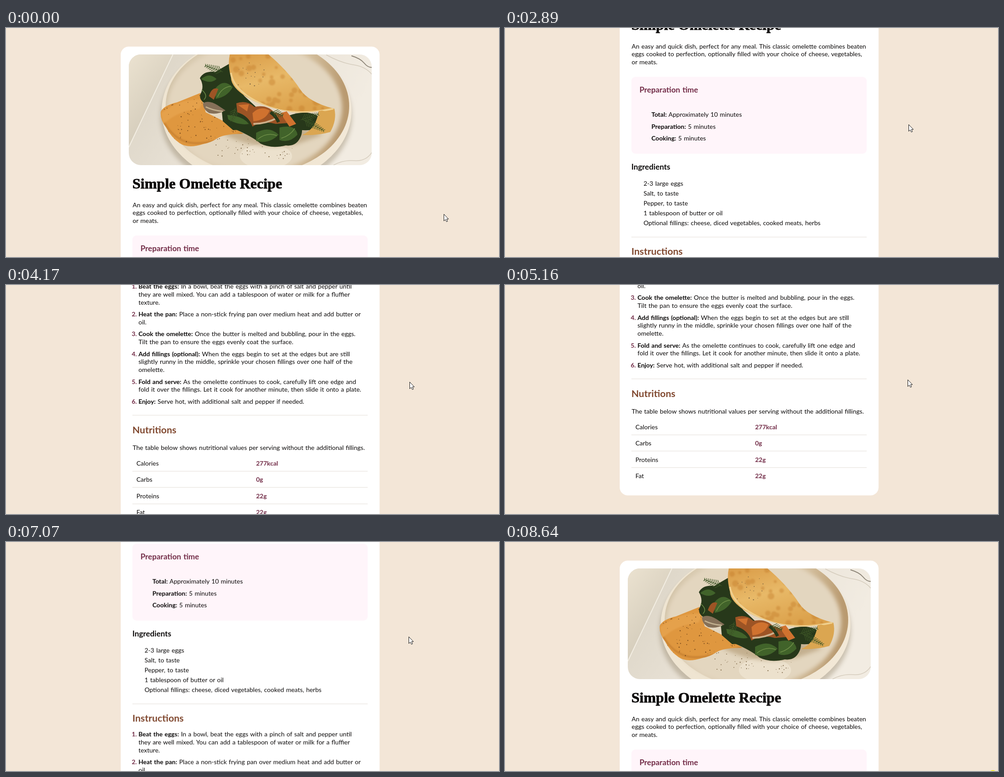
Animation of 1096x511 px, one loop 8.77 s. Source, as an HTML page:

```html
<!DOCTYPE html>
<html lang="en">
<head>
<meta charset="utf-8">
<title>Omelette recipe</title>
<style>
  html, body { margin: 0; width: 100%; height: 100%; overflow: hidden; background: #f3e6d7; }
  svg { display: block; width: 1096px; height: 511px; }
  text { font: 14px Lato, "Open Sans", sans-serif; word-spacing: .9px; fill: #0b0909; }
  .b { font-weight: 700; }
  .rose { font-weight: 700; fill: #722c47; }
  .h2 { font-size: 21.5px; font-weight: 700; fill: #80482f; }
  .h3 { font-size: 17.3px; font-weight: 700; }
  .title { font: 700 32.6px "Liberation Serif", "Noto Serif", serif; word-spacing: 0; stroke: #0b0909; stroke-width: .8px; }
  .rule { stroke: #e4ded8; }

  #page, #cursor, #spot { animation: 8770ms steps(1) infinite; }
  #page { animation-name: scroll; }
  #cursor { animation-name: point; }
  #spot { animation-name: spot; }

  @keyframes scroll {
    0% { transform: translateY(0); }
    22.83% { transform: translateY(0); animation-timing-function: steps(3); }
    25.177% { transform: translateY(-87.5px); animation-timing-function: steps(10); }
    32.93% { transform: translateY(-354px); }
    35.26% { transform: translateY(-354px); animation-timing-function: steps(16); }
    47.526% { transform: translateY(-885px); }
    53.61% { transform: translateY(-885px); animation-timing-function: steps(3); }
    55.85% { transform: translateY(-966px); }
    69.01% { transform: translateY(-966px); animation-timing-function: steps(5); }
    72.84% { transform: translateY(-768px); animation-timing-function: steps(3); }
    75.23% { transform: translateY(-612px); }
    77.56% { transform: translateY(-612px); animation-timing-function: steps(11); }
    86.07% { transform: translateY(-52px); animation-timing-function: steps(2); }
    87.66%, 100% { transform: translateY(0); }
  }
  @keyframes point {
    0% { transform: translate(973px, 415px); animation-timing-function: steps(3); }
    2.37% { transform: translate(880px, 350px); animation-timing-function: steps(5); }
    6.25% { transform: translate(660px, 175px); animation-timing-function: steps(3); }
    8.643% { transform: translate(590px, 143px); animation-timing-function: steps(2); }
    10.467% { transform: translate(559px, 150px); animation-timing-function: steps(3); }
    12.748% { transform: translate(544px, 170px); animation-timing-function: steps(6); }
    17.1% { transform: translate(640px, 232px); animation-timing-function: steps(4); }
    20.616% { transform: translate(883px, 217px); }
    21.3% { transform: translate(897px, 215px); }
    34.41% { transform: translate(897px, 210px); }
    36% { transform: translate(897px, 216px); }
    49% { transform: translate(896px, 211px); }
    50.6% { transform: translate(895px, 211px); }
    82.1% { transform: translate(899px, 211px); }
    88.46% { transform: translate(925px, 235px); }
    89.26% { transform: translate(974px, 273px); opacity: 1; }
    90.05%, 100% { transform: translate(974px, 273px); opacity: 0; }
  }
  @keyframes spot {
    0% { opacity: 0; }
    98.5%, 100% { opacity: 1; }
  }
</style>
</head>
<body>
<svg viewBox="0 0 1096 511">
  <defs>
    <clipPath id="frame"><rect x="273" y="59" width="540" height="247" rx="27"/></clipPath>
    <clipPath id="paste-clip"><path d="M344 187Q350 173 380 166L432 145 444 188 482 207 528 236Q485 236 470 246T438 259Q405 270 386 257T356 222Q342 204 344 187Z"/></clipPath>
    <clipPath id="egg-clip"><path id="fold" d="M498 57H581Q602 74 622 96T654 137Q672 165 729 180 726 190 702 184 666 192 632 187 570 176 535 154 500 132 500 110 492 80 498 57Z"/></clipPath>
    <linearGradient id="stone" x2="1" y2=".3">
      <stop stop-color="#d9d2c3"/><stop offset=".5" stop-color="#e9e2d6"/><stop offset="1" stop-color="#f2ece2"/>
    </linearGradient>
    <linearGradient id="wall" x2=".6" y2="1">
      <stop stop-color="#ebe2d0"/><stop offset="1" stop-color="#cfc7b6"/>
    </linearGradient>
    <linearGradient id="rim" x2="1">
      <stop stop-color="#efe5d2"/><stop offset=".6" stop-color="#eee3cf"/><stop offset="1" stop-color="#f3e9d8"/>
    </linearGradient>
    <linearGradient id="dish" x2="1" y2=".1">
      <stop stop-color="#cfc0a4"/><stop offset=".3" stop-color="#dfd1b9"/><stop offset=".75" stop-color="#d8c5a5"/><stop offset="1" stop-color="#b99a70"/>
    </linearGradient>
    <linearGradient id="egg" x2=".5" y2="1">
      <stop stop-color="#d99a45"/><stop offset=".5" stop-color="#e8b968"/><stop offset="1" stop-color="#dca24c"/>
    </linearGradient>
    <filter id="soft" x="-.5" y="-.5" width="2" height="2"><feGaussianBlur stdDeviation="5"/></filter>
    <filter id="smooth"><feGaussianBlur stdDeviation="1.5"/></filter>
  </defs>

  <g id="page">
    <rect x="255" y="41.5" width="575.5" height="1394" rx="18" fill="#fff"/>

    <g clip-path="url(#frame)">
      <rect x="273" y="59" width="540" height="247" fill="url(#stone)"/>
      <path d="M273 59H370L273 263Z" fill="url(#wall)"/>
      <path d="M371 59 273 266" stroke="#f3eee3" stroke-width="2"/>
      <g fill="none" stroke="#d5ccbd" stroke-width="1.5">
        <path d="M768 62Q788 68 796 78T813 88" stroke="#8d8577" stroke-width="2"/>
        <path d="M712 60Q745 78 772 82T813 103M728 306Q750 294 775 296T813 278"/>
      </g>
      <ellipse cx="556" cy="198" rx="213" ry="164" fill="#8f8065" opacity=".4" filter="url(#soft)"/>
      <ellipse cx="557" cy="185" rx="211" ry="164" fill="url(#rim)"/>
      <ellipse cx="559" cy="174" rx="204" ry="151" fill="url(#dish)"/>
      <ellipse cx="553" cy="178" rx="194" ry="142" fill="#e3d6bf" filter="url(#soft)"/>
      <ellipse cx="578" cy="286" rx="58" ry="28" fill="#ece1cd"/>
      <path d="M523 296Q545 316 590 312T634 278" fill="none" stroke="#cfbf a0" stroke-width="2"/>
      <path d="M480 235Q560 278 650 258L705 238 600 200Z" fill="#a58a60" opacity=".5" filter="url(#soft)"/>

      <g clip-path="url(#paste-clip)">
        <rect x="340" y="140" width="195" height="130" fill="#df973f"/>
        <path d="M345 190Q390 155 440 160L430 180Q380 185 350 215Z" fill="#e5a14c" filter="url(#smooth)"/>
        <path d="M352 212Q375 250 410 256T528 234" fill="none" stroke="#c98231" stroke-width="4" filter="url(#smooth)"/>
        <g id="pepper" fill="#7c4d1d"></g>
      </g>

      <g fill="#27381a">
        <path d="M431 112Q440 95 465 98L496 80 505 120 530 152 560 180 550 225 505 228 482 208 480 188 448 172Q428 162 432 148 442 130 431 112Z"/>
        <path d="M500 205 570 205 650 205Q664 225 654 245T622 262Q590 270 566 258 545 240 500 222Z"/>
        <path d="M630 195Q680 178 708 208L690 226Q655 232 632 222Z"/>
      </g>
      <path d="M438 168Q450 160 470 172L488 184Q470 194 452 190 438 182 438 168Z" fill="#857058"/>
      <path d="M444 176Q460 184 482 186" fill="none" stroke="#c2b08f" stroke-width="3"/>
      <g fill="#41632a">
        <path d="M434 114Q452 98 468 114 454 126 434 114ZM466 134Q484 112 504 132 492 154 466 158ZM556 234Q585 217 606 238 585 260 556 252ZM608 222Q644 214 648 238 630 258 608 250ZM492 194Q526 196 540 214 518 218 494 204Z"/>
      </g>
      <path d="M435 138Q450 150 440 160M470 154Q480 132 500 130M560 248Q580 232 602 240M612 246Q632 240 642 224" fill="none" stroke="#6f8f48" stroke-width="1.5"/>
      <path d="M451 152Q458 130 472 136L462 160ZM512 168Q535 160 552 176 580 170 596 188 616 190 628 212L600 214Q570 206 548 220 540 196 514 188Z" fill="#9d5425"/>
      <path d="M548 190Q565 172 586 184 578 206 550 208ZM516 172 540 170 536 186ZM610 190 624 186 645 214 630 220Z" fill="#d0722f"/>
      <path d="M550 214Q578 214 604 200" fill="none" stroke="#cdb08b" stroke-width="4"/>
      <path d="M588 188Q600 196 606 210" fill="none" stroke="#27381a" stroke-width="7"/>

      <path d="M695 185 730 180Q736 205 721 232 695 240 658 239 690 225 695 185Z" fill="#dba651"/>
      <use href="#fold" fill="url(#egg)"/>
      <g clip-path="url(#egg-clip)">
        <g id="browned" fill="#c27a2c" opacity=".4" filter="url(#smooth)"></g>
        <path d="M500 100Q505 134 550 160T640 187Q676 191 728 180" fill="none" stroke="#efcf8d" stroke-width="4"/>
      </g>
      <g id="specks" fill="#77603f"></g>
      <g id="dill" fill="none" stroke="#3d5526" stroke-width="1.2"></g>
    </g>

    <rect x="281" y="463" width="523" height="171.5" rx="9" fill="#fff5fa"/>
    <g id="copy"></g>
  </g>

  <ellipse id="spot" cx="1084.5" cy="513" rx="6" ry="4" fill="#f4ee2a"/>
  <path id="cursor" d="M.5.5V15.5L3.9 12.4 6.3 17.3 8.8 16.2 6.5 11.3H10.8Z" fill="#fff" stroke="#111" stroke-width="1"/>
</svg>
<script>
  const LINE = 17.7;
  const el = id => document.getElementById(id);
  let out = "";
  const text = (x, y, s, cls = "") => out += `<text x="${x}" y="${y}" class="${cls}">${s}</text>`;
  const rule = y => out += `<path class="rule" d="M281 ${y}H804"/>`;
  const lines = (x, y, step, list) => list.forEach((s, i) => text(x, y + i * step, s));
  const bold = s => `<tspan class="b">${s}</tspan>`;

  text(281, 358, "Simple Omelette Recipe", "title");
  lines(281.5, 399.5, LINE, [
    "An easy and quick dish, perfect for any meal. This classic omelette combines beaten",
    "eggs cooked to perfection, optionally filled with your choice of cheese, vegetables,",
    "or meats."
  ]);

  text(299, 498, "Preparation time", "h3 rose");
  lines(325.5, 552, 26.5, [
    bold("Total:") + " Approximately 10 minutes",
    bold("Preparation:") + " 5 minutes",
    bold("Cooking:") + " 5 minutes"
  ]);

  text(281, 669.5, "Ingredients", "h3");
  lines(308, 705.8, 22.1, [
    "2-3 large eggs",
    "Salt, to taste",
    "Pepper, to taste",
    "1 tablespoon of butter or oil",
    "Optional fillings: cheese, diced vegetables, cooked meats, herbs"
  ]);
  rule(820.5);

  text(281, 860, "Instructions", "h2");
  const steps = [
    ["Beat the eggs:", "In a bowl, beat the eggs with a pinch of salt and pepper until",
      "they are well mixed. You can add a tablespoon of water or milk for a fluffier", "texture."],
    ["Heat the pan:", "Place a non-stick frying pan over medium heat and add butter or", "oil."],
    ["Cook the omelette:", "Once the butter is melted and bubbling, pour in the eggs.",
      "Tilt the pan to ensure the eggs evenly coat the surface."],
    ["Add fillings (optional):", "When the eggs begin to set at the edges but are still",
      "slightly runny in the middle, sprinkle your chosen fillings over one half of the", "omelette."],
    ["Fold and serve:", "As the omelette continues to cook, carefully lift one edge and",
      "fold it over the fillings. Let it cook for another minute, then slide it onto a plate."],
    ["Enjoy:", "Serve hot, with additional salt and pepper if needed."]
  ];
  let y = 893.2;
  steps.forEach(([name, first, ...rest], i) => {
    text(279.5, y, i + 1 + ".", "rose");
    lines(294.5, y, LINE, [bold(name) + " " + first, ...rest]);
    y += LINE * (rest.length + 1) + LINE / 2;
  });
  rule(1175.5);

  text(281, 1215.5, "Nutritions", "h2");
  text(281.5, 1253, "The table below shows nutritional values per serving without the additional fillings.");
  [["Calories", "277kcal"], ["Carbs", "0g"], ["Proteins", "22g"], ["Fat", "22g"]].forEach(([name, value], i) => {
    const top = i * 36.3;
    text(290, 1288 + top, name);
    text(556, 1288 + top, value, "rose");
    if (i < 3) rule(1300.5 + Math.round(top));
  });
  el("copy").innerHTML = out;

  let seed = 7;
  const rnd = () => (seed = seed * 16807 % 2147483647) / 2147483647;
  const dots = (n, x, y, w, h, r = .5) => Array.from({ length: n }, () =>
    `<circle cx="${x + rnd() * w}" cy="${y + rnd() * h}" r="${r * (1 + 1.5 * rnd())}"/>`).join("");
  el("pepper").innerHTML = dots(90, 348, 150, 170, 105);
  el("browned").innerHTML = dots(60, 495, 60, 220, 125, 3);
  el("specks").innerHTML = dots(26, 455, 246, 100, 45) + dots(16, 560, 258, 80, 34) + dots(16, 515, 75, 60, 60);

  // Feathery sprig: a stem with paired leaves that shorten towards the tip
  const sprig = (x, y, angle, size) => {
    let d = `M0 0H${size}`;
    for (let i = 4; i < size; i += 5) {
      const leaf = 3 + 7 * (1 - i / size);
      d += `M${i} 0l${leaf} ${-leaf}M${i} 0l${leaf} ${leaf}`;
    }
    return `<path d="${d}" transform="translate(${x} ${y}) rotate(${angle})"/>`;
  };
  el("dill").innerHTML = sprig(482, 98, 200, 42) + sprig(655, 205, -18, 42) +
    sprig(662, 205, 28, 50) + sprig(590, 186, 20, 28) + sprig(510, 178, 105, 30);
</script>
</body>
</html>
```
